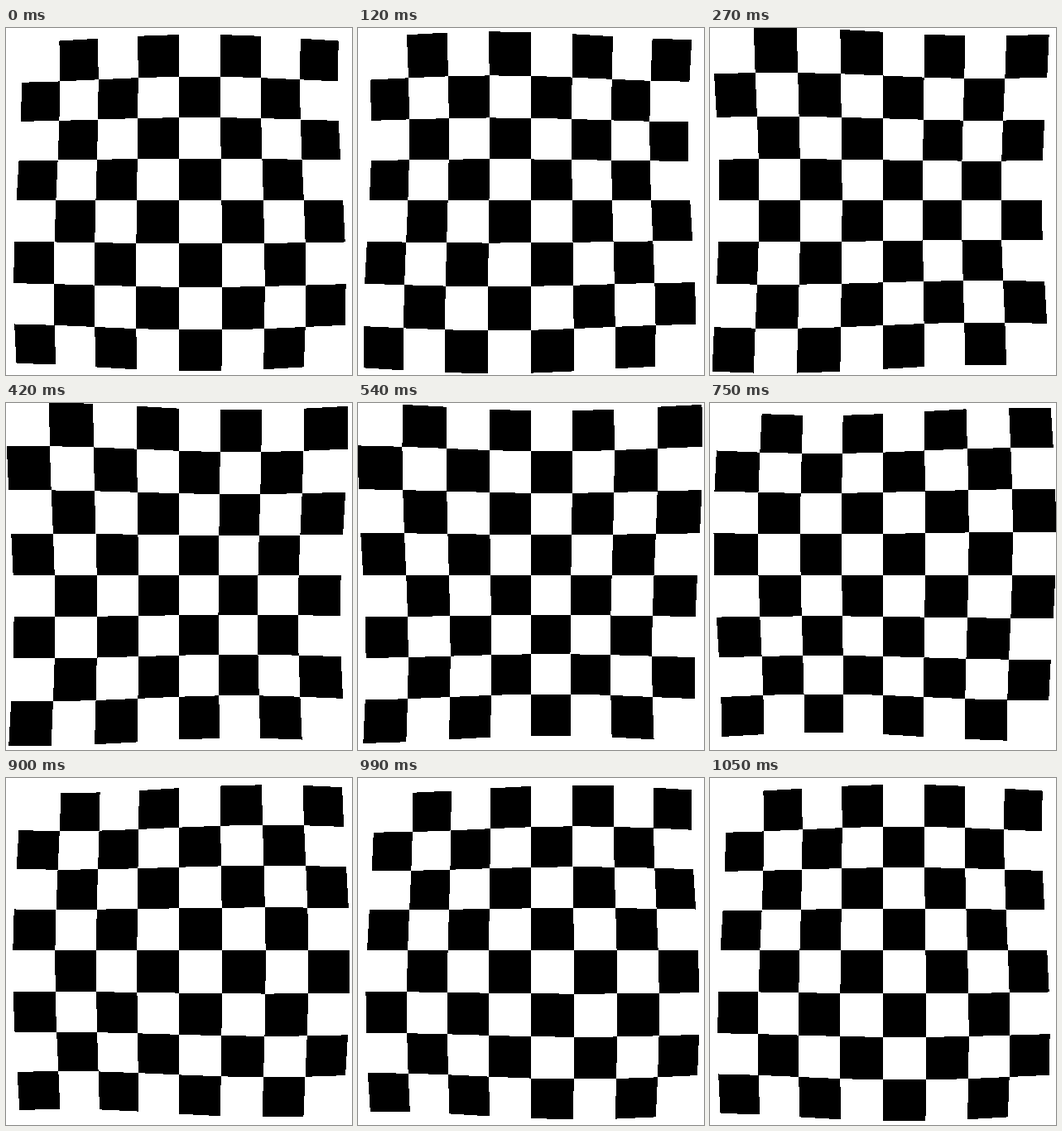
Animation of 418 by 419 pixels, one loop 1.08 s. Source, as an HTML page:

```html
<!DOCTYPE html>
<html lang="en">
<head>
<meta charset="utf-8">
<title>Rippling checkerboard</title>
<style>
  html, body { margin: 0; width: 100%; height: 100%; overflow: hidden; background: #fff; }
  svg { display: block; width: 418px; height: 419px; }
</style>
</head>
<body>
<svg viewBox="0 0 418 419" shape-rendering="crispEdges"><path id="board" fill="#000"/></svg>
<script>
const LOOP = 1080, TICK = 30;
const CELLS = 8, CELL = 49.9, CENTER = { x: 209, y: 208.3 };
const STEPS = 30, START = -Math.PI / 10;
const WAVE = Math.PI / 5, HEIGHT = 0.0246;
const heldSteps = new Set([9, 11, 13, 18, 23]);

// Which step of the cycle shows in each tick; held steps last two ticks.
const schedule = [];
for (let step = 0; step <= STEPS; step++) {
  schedule.push(step);
  if (heldSteps.has(step)) schedule.push(step);
}

const board = document.getElementById('board');

// Two crossing waves raise the sheet; height scales a point away from the center.
function vertex(col, row, phase) {
  const u = col - CELLS / 2, v = row - CELLS / 2;
  const lift = Math.cos(WAVE * u + phase) + Math.sin(WAVE * v - phase);
  const size = CELL * (1 + HEIGHT * lift);
  return (CENTER.x + u * size).toFixed(2) + ' ' + (CENTER.y + v * size).toFixed(2);
}

function render(time) {
  const tick = Math.floor((time % LOOP) / TICK);
  const phase = START + 2 * Math.PI * schedule[tick] / STEPS;
  let d = '';
  for (let row = 0; row < CELLS; row++) {
    for (let col = (row + 1) % 2; col < CELLS; col += 2) {
      const corners = [[0, 0], [1, 0], [1, 1], [0, 1]]
        .map(([dx, dy]) => vertex(col + dx, row + dy, phase));
      d += 'M' + corners.join('L') + 'Z';
    }
  }
  board.setAttribute('d', d);
}

const begin = performance.now();
function frame() {
  render(performance.now() - begin);
  requestAnimationFrame(frame);
}
frame();
</script>
</body>
</html>
```
